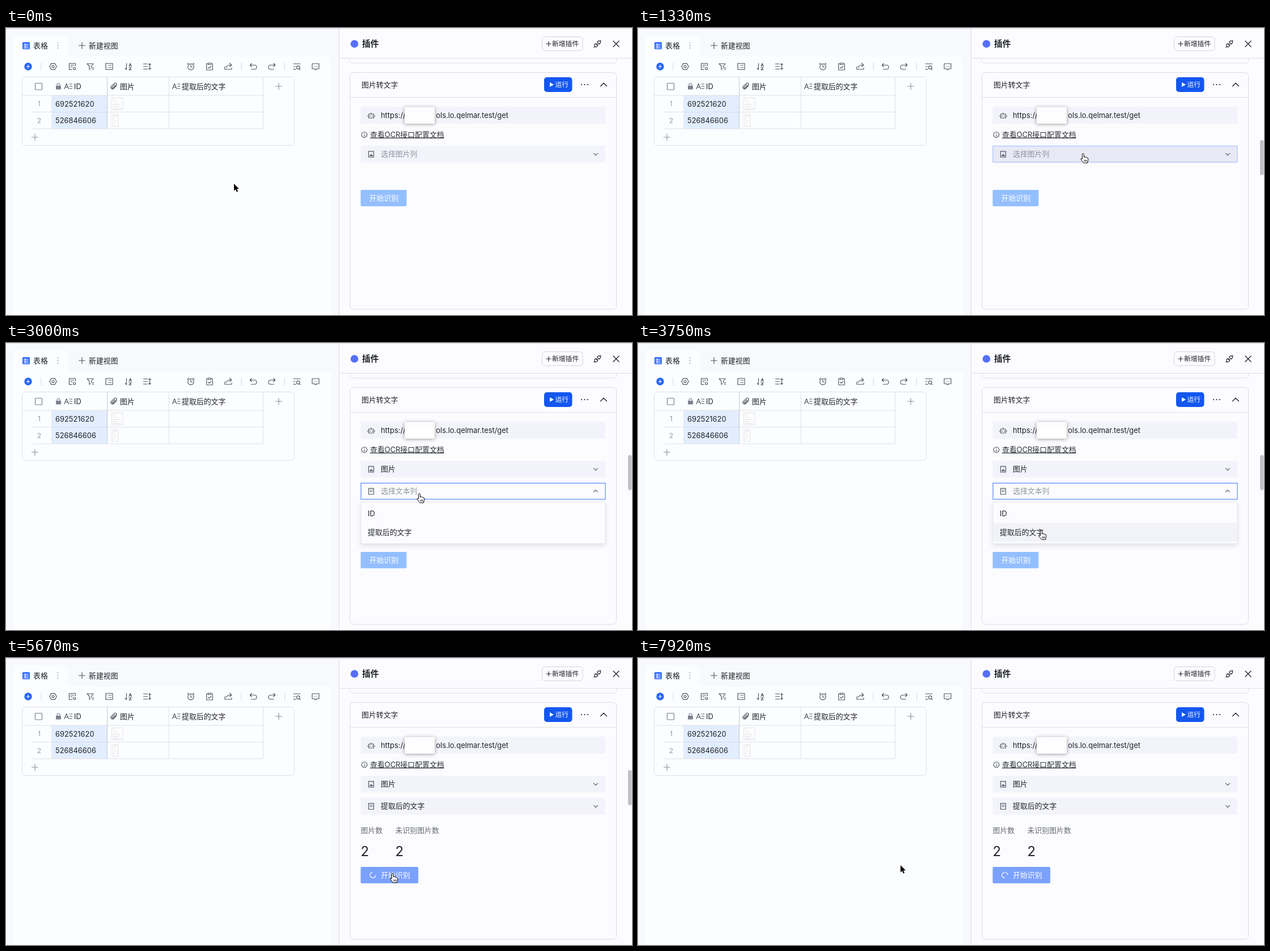
An HTML page for the animation above (8 s loop, 1104 by 507 pixels).

```html
<!DOCTYPE html>
<html lang="zh-CN">
<head>
<meta charset="utf-8">
<title>图片转文字</title>
<style>
html, body { margin: 0; width: 100%; height: 100%; overflow: hidden; background: #fcfcff; }
svg { display: block; width: 100%; height: 100%; }
text { font-family: Inter, "Noto Sans CJK SC", "Noto Sans CJK", sans-serif; white-space: pre; }
.icon { fill: none; stroke: #4f555f; stroke-width: 1.15; stroke-linecap: round; stroke-linejoin: round; }
.line { fill: none; stroke: #dee0e6; }
.menu { filter: drop-shadow(0 3px 4px rgba(30, 35, 50, .12)); }
.mask { filter: drop-shadow(0 1px 3px rgba(0, 0, 0, .38)); }
</style>
</head>
<body>
<svg id="stage" viewBox="0 0 1104 507"></svg>
<script>
const INK = '#1f2329', GREY = '#646a73', HINT = '#8f959e', BLUE = '#165dff';
const LOOP = 8000, STEP = 1000 / 12;
const stage = document.getElementById('stage');

// Vertical position is the optical centre of the line.
const text = (x, cy, str, fill = INK, size = 12.9, extra = '') =>
  `<text x="${x}" y="${cy + size * .365}" font-size="${size}" fill="${fill}" ${extra}>${str}</text>`;
const rect = (x, y, w, h, fill, extra = '') =>
  `<rect x="${x}" y="${y}" width="${w}" height="${h}" fill="${fill}" ${extra}/>`;
const icon = (x, y, d, extra = '') =>
  `<path class="icon" transform="translate(${x} ${y})" d="${d}" ${extra}/>`;
const line = (d, color = '#dee0e6') => `<path class="line" d="${d}" style="stroke:${color}"/>`;
// Shows its content only in the listed frame ranges, such as "3-8,20-30".
const during = (ranges, body) => `<g data-on="${ranges}">${body}</g>`;

const PLUS = 'M-5.5 0H5.5M0-5.5V5.5';
const DOWN = 'M-3.5-1.7L0 1.8 3.5-1.7';
const UP = 'M-3.5 1.7L0-1.8 3.5 1.7';
const TEXT_TYPE = 'M-7 4.5L-3.3-4.5.4 4.5M-5.7 1.5H-.9M2.2-4H6.5M2.2 0H6.5M2.2 4H6.5';
const PAGE = 'M-4.5-5.2H4.5V5.2H-4.5Z';

const toolbar = () => [
  [83, 'M-3.1-5.4H3.1L6.2 0 3.1 5.4H-3.1L-6.2 0ZM2 0A2 2 0 1 1-2 0 2 2 0 1 1 2 0'],
  [117, 'M5.5-1V-5.5H-5.5V5.5H-.5M-3-2.5H3M-3 .5H0M5.6 3.5A2 2 0 1 1 1.6 3.5 2 2 0 1 1 5.6 3.5'],
  [149, 'M-6-5H5L1.5-.5V2M-6-5L-2-.5V5L0 4M3 2.2H6M3 5H6'],
  [182, 'M-6-5.5H6V5.5H-6ZM-3.3-2.3H-3M-3.3 2H-3M-.5-2.3H3.5M-.5 2H3.5'],
  [216, 'M-3.5-5.5V5.5L-6 3M1 0L3.2-5.5 5.4 0M1.7-1.8H4.7M1 2H5L1 6H5.2'],
  [249, 'M-6.5-4.5H.5M-6.5 0H.5M-6.5 4.5H.5M4.5-5V5M2.8-3.3L4.5-5.2 6.2-3.3M2.8 3.3L4.5 5.2 6.2 3.3'],
  [326, 'M5.3.6A5.3 5.3 0 1 1-5.3.6 5.3 5.3 0 1 1 5.3.6M0-2.5V1H2.7M-6-4L-4-5.8M6-4L4-5.8'],
  [359, 'M-2.5-5H-5.3V6H5.3V-5H2.5M-2.5-6H2.5V-3.5H-2.5ZM-2.5 1.2L-.5 3 3-.6'],
  [392, 'M-6 0V5H6V2.5M-3.5 1.5Q-2.5-2.8 5.5-2.8M2.5-6L5.8-2.8 2.5.2'],
  [436, 'M-2.7-5.5L-5.7-2.5-2.7.5M-5.7-2.5H2Q6-2.5 6 1.3T2 5H-3.5'],
  [469, 'M2.7-5.5L5.7-2.5 2.7.5M5.7-2.5H-2Q-6-2.5-6 1.3T-2 5H3.5'],
  [513, 'M-6-4.8H6M-6 0H-3M-6 4.8H-2M5 1.7A2.8 2.8 0 1 1-.6 1.7 2.8 2.8 0 1 1 5 1.7M4.2 3.7L6.2 5.7'],
  [546, 'M-6-5H6V4H2L0 6-2 4H-6ZM-2.5-.5H-2.4M0-.5H.1M2.5-.5H2.6']
].map(([x, d]) => icon(x, 68, d)).join('');

const leftPane = () =>
  rect(0, 0, 587, 507, '#f8f9fd') +
  `<path d="M13 507V21Q13 13 21 13H101Q109 13 109 21V50H565Q573 50 573 58V507Z" fill="#fcfdff"/>` +
  rect(29, 25, 13, 12.5, '#2f6bff', 'rx="1.5"') +
  line('M31 29H40M31 32H40M31 35H40M34 27V36', '#fff') +
  text(48, 31, '表格') + icon(91.5, 31, 'M0-4.5V-4.4M0 0V.1M0 4.5V4.6', 'style="stroke:#8f959e;stroke-width:1.8"') +
  icon(134, 31, PLUS) + text(146, 31, '新建视图') +
  `<circle cx="39" cy="68" r="6.7" fill="#2463f5"/>` + icon(39, 68, 'M-3 0H3M0-3V3', 'style="stroke:#fff"') +
  line('M62 61V75M415 61V75M491.5 61V75', '#d5d8e0') + toolbar();

const table = () =>
  rect(28.5, 86.5, 480, 121, '#fcfdff', 'rx="6" stroke="#dcdfe5"') +
  rect(80, 119, 98, 59, '#e2edfe') +
  line('M29 119H453M45 148.5H453M45 178H453M287.5 87V178M453.5 87V178') +
  line('M178.5 87V178', '#c6cad2') + line('M80 148.5H178', '#d3dff1') +
  rect(51.5, 97.5, 12, 11.5, 'none', 'rx="1" stroke="#757b85" stroke-width="1.1"') +
  rect(88, 102, 9, 6.5, '#7c828c', 'rx="1"') + icon(92.5, 103, 'M-2.5-1V-2.5A2.5 2.5 0 0 1 2.5-2.5V-1', 'style="stroke:#7c828c"') +
  icon(110, 103, TEXT_TYPE) + text(120, 103, 'ID') +
  icon(190, 103, 'M4.8-1.2L-.2 4.2A3 3 0 0 1-4.5.1L1.2-5.2A2.2 2.2 0 0 1 4.4-2.1L-.9 3A1.2 1.2 0 0 1-2.6 1.3L2-3') +
  text(201, 103, '图片') + icon(300.5, 103, TEXT_TYPE) + text(310, 103, '提取后的文字') +
  icon(481, 103, PLUS, 'style="stroke:#8b919b"') + icon(51, 193, PLUS, 'style="stroke:#8b919b"') +
  ['692521620', '526846606'].map((id, i) =>
    text(58.5, 134 + i * 29.5, i + 1, HINT, 12, 'text-anchor="middle"') + text(87, 134 + i * 29.5, id)).join('') +
  rect(186.5, 123.5, 19.5, 21, '#fdfdfd', 'stroke="#e1e2e5"') +
  line('M188 127H193M190 131H196M188 135H201M188 138.5H198M188 142H204', '#dfe0e2') +
  rect(187, 153, 10.5, 21, '#fdfdfd', 'stroke="#e1e2e5"') +
  line('M190 156H195M189 160H192M191 164H194M189 168H192', '#d8dadd');

const panel = () =>
  rect(587, 0, 517, 507, '#fcfcff') + line('M587.5 1V507M588 53.5H1104', '#dcdfe5') +
  `<circle cx="614.5" cy="28" r="6.8" fill="#5570f6"/>` +
  text(628, 28, '插件', INK, 14.7, 'font-weight="600"') +
  rect(945.5, 15.5, 71.5, 24.5, '#fcfcff', 'rx="5" stroke="#d0d3d9"') +
  icon(957, 28, 'M-4 0H4M0-4V4', `style="stroke:${INK}"`) + text(963, 28, '新增插件', INK, 11.8) +
  icon(1043, 28, 'M-1.5-2.5L2.5 1.5M-2.7-1.3Q-6 2-3.5 3.5T1.3 2.7M-.2-3.8Q2.5-6 4-4T3.8.2M4.2-4.2L6-6M-4-4L-6 6', 'style="stroke-width:0"') +
  icon(1043, 28, 'M-.5-3.2L1-4.7Q3-6 4.7-4.5T4.7-1L3.2.5ZM-3.2-.5L-4.7 1Q-6 3-4.5 4.7T-1 4.7L.5 3.2ZM4.7-4.7L6.2-6.2M-4.7 4.7L-6.2 6.2M-1.8 1L-.6-.2M-.2 2.2L1 1', `style="stroke:${INK}"`) +
  icon(1076, 28, 'M-5-5L5 5M5-5L-5 5', `style="stroke:${INK};stroke-width:1.4"`) +
  line('M606.5 54V57Q606.5 62 612 62H1071Q1076.5 62 1076.5 57V54') +
  rect(606.5, 78.5, 470, 418.5, '#fcfcff', 'rx="6" stroke="#d9dce2"') + line('M607 122.5H1076') +
  text(627, 100, '图片转文字', INK, 12.9, 'font-weight="500"') +
  rect(949, 87, 49.5, 26, '#1456f0', 'rx="5"') + `<path d="M959 96L966 100 959 104Z" fill="#fff"/>` +
  text(968.5, 100, '运行', '#fff', 11.8) +
  [1015, 1020.5, 1026].map(x => `<circle cx="${x}" cy="100" r="1.1" fill="${INK}"/>`).join('') +
  icon(1054, 100, 'M-5.5 2.8L0-2.8 5.5 2.8', `style="stroke:${INK};stroke-width:1.3"`);

const address = () =>
  rect(625.5, 139, 431.5, 30, '#f3f4fb') +
  icon(644, 155, 'M-4.3-3H4.3V4H-4.3ZM0-3V-5.3M-6 0V1.5M6 0V1.5M-1.8 0V1M1.8 0V1') +
  text(661, 154.5, 'https://') + text(886, 154.5, 'ols.lo.qelmar.test/get', INK, 12.9, 'text-anchor="end"') +
  `<g class="mask">${rect(703, 139.5, 53, 29.5, '#fdfdff')}</g>` +
  rect(708, 150, 42, 14, '#fff') +
  icon(632, 188.5, 'M4.8 0A4.8 4.8 0 1 1-4.8 0 4.8 4.8 0 1 1 4.8 0M0-.3V2.4M0-2.4V-2.3') +
  text(642, 188, '查看OCR接口配置文档', '#2b3038', 12.9, 'text-decoration="underline"');

// A select field: resting, hovered, focusing and open looks, then the chosen value.
function field({ y, mark, hint, value, hover, focus, open, picked }) {
  const [from, to] = open;
  const box = (fill, stroke) => rect(626, y + .5, 431, 28.5, fill, `stroke="${stroke}"`);
  return rect(625.5, y, 431.5, 29.5, '#f3f4fb') +
    hover.map(([range, fill]) => during(range, rect(625.5, y, 431.5, 29.5, fill))).join('') +
    during(`${focus}-${from}`, box('#e9e9f6', '#9bbcfa')) +
    during(`${from}-${to}`, box('#fcfcff', '#3b74f6')) +
    icon(644, y + 15, mark) +
    during(`0-${picked}`, text(661, y + 14.7, hint, HINT)) +
    during(`${picked}-96`, text(661, y + 14.7, value)) +
    during(`0-${from},${to}-96`, icon(1040, y + 15, DOWN)) +
    during(`${from}-${to}`, icon(1040, y + 14.5, UP));
}

const menu = (y, items, range, active, activeRange) => during(range,
  `<g class="menu">${rect(626, y, 431, items.length * 33 + 8, '#fcfcff', 'rx="2" stroke="#e3e5eb"')}</g>` +
  during(activeRange, rect(626.5, y + 4.3 + active * 33, 430, 33, '#f2f3f8')) +
  items.map((item, i) => text(638, y + 20.7 + i * 33, item)).join(''));

const form = () =>
  field({ y: 208, mark: PAGE + 'M-2.5 3L-.8.5 .5 2 1.5 1 2.7 3ZM1.5-2.5H1.6', hint: '选择图片列', value: '图片',
          hover: [['7-17', '#e9e9f4']], focus: 14, open: [17, 26], picked: 26 }) +
  during('26-96',
    field({ y: 247, mark: PAGE + 'M-2-2H2M-2 .5H2', hint: '选择文本列', value: '提取后的文字',
            hover: [['26-28', '#e2e4eb'], ['28-36', '#e7e8ef']], focus: 32, open: [35, 49], picked: 49 }) +
    text(625.5, 304.5, '图片数', GREY) +
    during('26-50', text(625.5, 341, '0', INK, 24)) +
    during('50-96', text(625.5, 341, '2', INK, 24) + text(686.5, 304.5, '未识别图片数', GREY) + text(686.5, 341, '2', INK, 24))) +
  `<g id="button"><rect id="plate" x="625.5" width="81" height="29" rx="2"/>` +
  during('0-68', text(640.5, 14.5, '开始识别', '#fff')) +
  during('68-96', text(661, 14.5, '开始识别', '#fff') +
    `<path id="spinner" d="M5 0A5 5 0 1 1 0-5" fill="none" stroke="#fff" stroke-width="1.2"/>`) + '</g>' +
  menu(241.5, ['图片'], '17-26', 0, '20-26') +
  menu(280.5, ['ID', '提取后的文字'], '35-49', 1, '41-49') +
  during('7-70', rect(1097, 198, 6.5, 62, '#c1c1c4', 'rx="3.2"'));

const pointer = () => '<g id="pointer">' +
  during('0-7,50-63,69-96', '<path d="M0 0V12.8L2.9 10.1 4.9 14.7 7 13.8 5 9.3H9Z" fill="#000" stroke="#fff" stroke-width="1.4" paint-order="stroke"/>') +
  during('7-50,63-69', '<path d="M-1.5 1.5A1.5 1.5 0 0 1 1.5 1.5V6.4Q1.8 5.5 3 5.6 4.2 5.7 4.5 6.8 5 6 6 6.3T7 7.5Q8.9 7.2 8.9 9.2V11.5Q8.6 13 7.9 14V16.3H1Q-.5 14.5-2.5 12-4.5 9.6-3.6 8.9-2.6 8-1.5 9.6Z" fill="#fff" stroke="#000"/>' +
    '<path d="M2.2 10.8V14M4.2 10.8V14M6.1 10.8V14" stroke="#000" stroke-width=".9"/>') + '</g>';

stage.innerHTML = leftPane() + table() + panel() + address() + form() +
  rect(0, 0, 1104, 1.5, '#e4e5e8') + pointer();

const timed = [...stage.querySelectorAll('[data-on]')].map(node => ({
  node, ranges: node.dataset.on.split(',').map(r => r.split('-').map(Number))
}));
const [button, plate, spinner, cursor] = ['button', 'plate', 'spinner', 'pointer'].map(id => document.getElementById(id));

// Each entry: frame, x, y.
const path = [[2, 402, 275], [8, 785, 222], [17, 785, 222], [22, 730, 261.5], [35, 730, 261.5], [41, 715, 321],
  [45, 711, 331], [54, 711, 331], [59, 730, 357], [64, 688, 381], [67, 688, 381], [77, 463, 366]];
const plateColors = [[0, '#94bfff'], [50, BLUE], [63, '#4080ff'], [66, '#0e42d2'], [68, '#7ba1ff']];

function cursorAt(frame) {
  const next = path.findIndex(p => p[0] > frame);
  if (next === 0) return path[0].slice(1);
  if (next < 0) return path[path.length - 1].slice(1);
  const [a, b] = [path[next - 1], path[next]];
  const u = (frame - a[0]) / (b[0] - a[0]), k = u * u * (3 - 2 * u);
  return [1, 2].map(i => a[i] + (b[i] - a[i]) * k);
}

function draw(ms) {
  const frame = Math.min(95, Math.floor((ms + 4) / STEP));
  for (const { node, ranges } of timed)
    node.style.display = ranges.some(([a, b]) => frame >= a && frame < b) ? '' : 'none';
  button.setAttribute('transform', `translate(0 ${frame < 26 ? 286 : 369})`);
  plate.setAttribute('width', frame < 68 ? 81 : 101.5);
  plate.setAttribute('fill', plateColors.filter(c => c[0] <= frame).pop()[1]);
  spinner.setAttribute('transform', `translate(647 14.5) rotate(${(frame - 68) * 30})`);
  cursor.setAttribute('transform', `translate(${cursorAt(frame)})`);
}

const start = performance.now();
function tick() {
  draw((performance.now() - start) % LOOP);
  requestAnimationFrame(tick);
}
tick();
</script>
</body>
</html>
```
